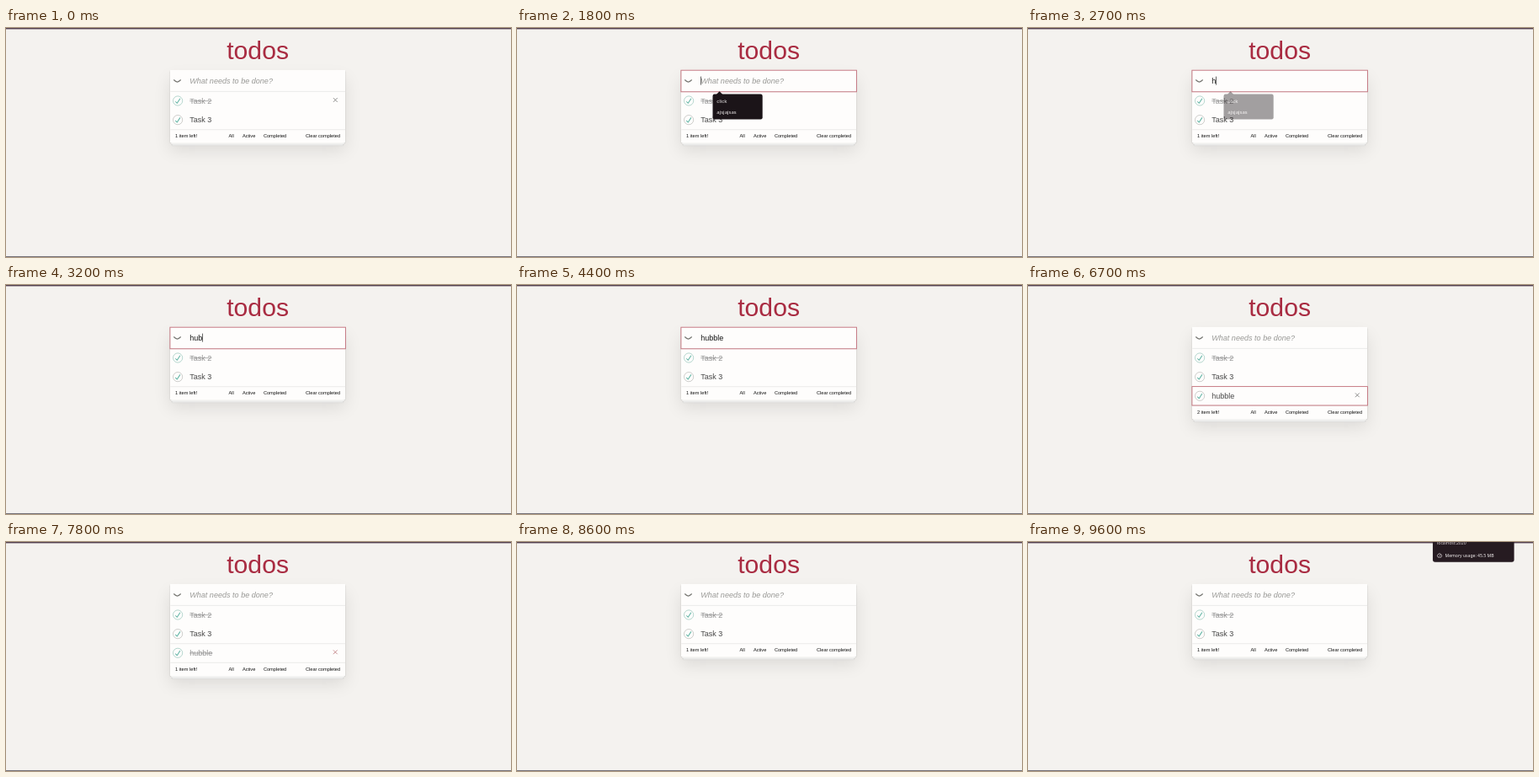
Recreate the animation shown at these times as an HTML page. Size 600 px wide and 272 px high, loop 9700 ms.

```html
<!DOCTYPE html>
<html lang="en">
<head>
<meta charset="utf-8">
<title>todos</title>
<style>
html, body { margin: 0; width: 100%; height: 100%; overflow: hidden; background: #f4f2ef; }
#stage { position: absolute; left: 0; top: 0; width: 600px; height: 272px; overflow: hidden; }
#card, #stack { position: absolute; left: 195.3px; width: 207.8px; }
#card { top: 50.4px; background: #fefdfc; box-shadow: 0 .8px 1.6px rgba(0,0,0,.2), 0 9.5px 19px rgba(0,0,0,.1); }
#stack {
  height: 18.9px;
  box-shadow: 0 .4px .4px rgba(0,0,0,.2), 0 3px 0 -1.1px #f6f6f4, 0 3.4px .4px -1.1px rgba(0,0,0,.2),
    0 6px 0 -2.3px #f6f6f4, 0 6.4px .8px -2.3px rgba(0,0,0,.2);
}
svg { position: absolute; left: 0; top: 0; }
text { font-family: "Liberation Sans", Arial, sans-serif; white-space: pre; }
.label { font-size: 9.07px; fill: #484848; }
.foot text { font-size: 5.67px; fill: #111; }
.popup text { font-family: "Noto Sans", sans-serif; fill: #f4f0f0; }
.ring { fill: none; stroke: #c26e79; stroke-width: .9; }
.line { stroke: #e0e0dd; stroke-width: .6; }
.cross { fill: none; stroke-width: .85; }
</style>
</head>
<body>
<div id="stage">
  <div id="card"></div>
  <div id="stack"></div>
  <svg width="600" height="272" viewBox="0 0 600 272">
    <rect width="600" height="1.4" fill="#54404f"/>
    <rect y="271" width="600" height="1" fill="#77747a"/>
    <text x="262.2" y="36.9" font-size="30.2" fill="#a92c42">todos</text>

    <path d="M199.3 61.6Q201.8 63.9 203.5 64.1Q205.2 63.9 207.7 61.6" fill="none" stroke="#777772" stroke-width="1.3"/>
    <text id="hint" class="label" x="218.2" y="66.2" font-style="italic" style="fill:#999996">What needs to be done?</text>
    <text id="typed" class="label" x="218.2" y="66.2" style="fill:#151515"></text>
    <rect id="caret" y="57.6" width=".7" height="10" fill="#222"/>

    <g id="rows"></g>

    <g id="foot" class="foot">
      <path class="line" d="M195.3 120.7H403.1"/>
      <text id="count" x="201" y="130.4"></text>
      <text x="264.6" y="130.4">All</text>
      <text x="280.9" y="130.4">Active</text>
      <text x="305.9" y="130.4">Completed</text>
      <text x="355.9" y="130.4">Clear completed</text>
    </g>

    <rect id="inputRing" class="ring" x="194.9" y="50.2" width="208.5" height="25.6"/>
    <rect id="rowRing" class="ring" x="194.9" y="120.6" width="208.5" height="22.4"/>
    <rect id="crossRing" class="ring" x="383.4" y="124.4" width="15.2" height="15.2"/>

    <g id="menu" class="popup" font-size="6" font-weight="500">
      <path d="M236.8 79L240.6 75.3L244.4 79Z" fill="#1b1418"/>
      <rect x="232.5" y="78.5" width="59.2" height="30" rx="2.2" fill="#1b1418"/>
      <text x="237.3" y="89">click</text>
      <text x="237.3" y="102.3">ajsjajsas</text>
    </g>

    <g id="tip" class="popup" font-size="5.1">
      <rect x="480.6" y="-6" width="97.2" height="30.3" rx="3" fill="#000" opacity=".15"/>
      <rect x="481" y="-6" width="96.5" height="29.8" rx="2.8" fill="#261b21"/>
      <text x="486" y="2.8" style="fill:#d8d0d4">localhost:2020</text>
      <path d="M487.2 18.1A2.5 2.5 0 1 1 490.8 18.1ZM489 16.6L490.2 15" fill="none" stroke="#e4dee0" stroke-width=".7"/>
      <text x="495.6" y="18.2">Memory usage: 45.5 MB</text>
    </g>
  </svg>
</div>
<script>
const LOOP = 9700, ROW = 22.65;
const $ = id => document.getElementById(id);
const show = (el, on) => { el.style.display = on ? "" : "none"; };
const within = (t, ...spans) => spans.some(([a, b]) => t >= a && t < b);
const ramp = (t, start, length) => Math.min(1, Math.max(0, (t - start) / length));
const mix = (a, b, k) => `rgb(${a.map((v, i) => Math.round(v + (b[i] - v) * k))})`;

const INK = [72, 72, 72], GREY = [148, 148, 148], CROSS = [125, 125, 122], HOT = [190, 125, 128];

// Each entry: start time and the text in the field from then on.
const typing = [[0, ""], [2500, "h"], [2900, "hu"], [3200, "hub"], [3300, "hubb"],
  [3600, "hubbl"], [3800, "hubble"], [4800, ""]];
const caretOn = [[700, 1300], [1800, 4400], [5000, 5500], [6200, 6700]];

function makeRow(name, i) {
  const g = document.createElementNS($("rows").namespaceURI, "g");
  g.setAttribute("transform", `translate(0 ${i * ROW})`);
  g.innerHTML = `
    <path class="line" d="M195.3 75.4H403.1"/>
    <g transform="translate(204.1 86.5) scale(.112) translate(-50 -50)">
      <circle cx="50" cy="50" r="50" fill="none" stroke-width="5"/>
      <path d="M72 25L42 71 27 56l-4 4 20 20 34-52z" fill="#3ea390" stroke="#3ea390" stroke-width="2"/>
    </g>
    <text class="label" x="218.2" y="89.6">${name}</text>
    <path class="strike" stroke-width=".75"/>
    <path class="cross" d="M388.9 83.1L393.7 87.9M393.7 83.1L388.9 87.9"/>`;
  $("rows").append(g);
  const [circle, tick, label, strike, cross] =
    ["circle", "g path", "text", ".strike", ".cross"].map(s => g.querySelector(s));
  strike.setAttribute("d", `M218.2 86.7h${label.getComputedTextLength()}`);
  return { g, circle, tick, label, strike, cross };
}

function setRow(row, done, fade, cross) {
  const ink = mix(INK, GREY, fade);
  row.circle.setAttribute("stroke", done ? "#7fb8ab" : "#a9a9a6");
  show(row.tick, done);
  show(row.strike, done);
  row.label.style.fill = ink;
  row.strike.setAttribute("stroke", ink);
  show(row.cross, cross);
}

const rows = ["Task 2", "Task 3", "hubble"].map(makeRow);

function draw(time) {
  const t = Math.floor((time % LOOP) / 100) * 100;
  const three = within(t, [4800, 8400]);
  const done = t >= 6900;
  const drop = three ? ROW : 0;

  const value = typing.filter(([at]) => t >= at).pop()[1];
  $("typed").textContent = value;
  show($("hint"), !value);
  show($("caret"), within(t, ...caretOn));
  $("caret").setAttribute("x", 218 + (value ? $("typed").getComputedTextLength() + .2 : 0));

  setRow(rows[0], true, 1, t < 700);
  rows[0].cross.setAttribute("stroke", mix(CROSS, GREY, t < 200 ? 0 : 1));
  setRow(rows[1], false, 0, false);
  setRow(rows[2], done, ramp(t, 6800, 400), t >= 5500);
  rows[2].cross.setAttribute("stroke",
    t < 5600 ? mix(CROSS, GREY, 1) : mix(CROSS, HOT, ramp(t, 7600, 200)));
  show(rows[2].g, three);

  $("card").style.height = 86 + drop + "px";
  $("stack").style.top = 117.5 + drop + "px";
  $("foot").setAttribute("transform", `translate(0 ${drop})`);
  $("count").textContent = (three && !done ? 2 : 1) + " item left!";

  show($("inputRing"), within(t, [700, 6700]));
  show($("rowRing"), within(t, [6700, 6900]));
  show($("crossRing"), within(t, [8200, 8400]));
  show($("menu"), within(t, [700, 2900]));
  $("menu").setAttribute("opacity", 1 - ramp(t, 2400, 500));
  show($("tip"), t >= 9500);
  $("tip").setAttribute("opacity", t < 9600 ? .6 : 1);
}

const start = performance.now();
function tick() {
  draw(performance.now() - start);
  requestAnimationFrame(tick);
}
tick();
</script>
</body>
</html>
```
